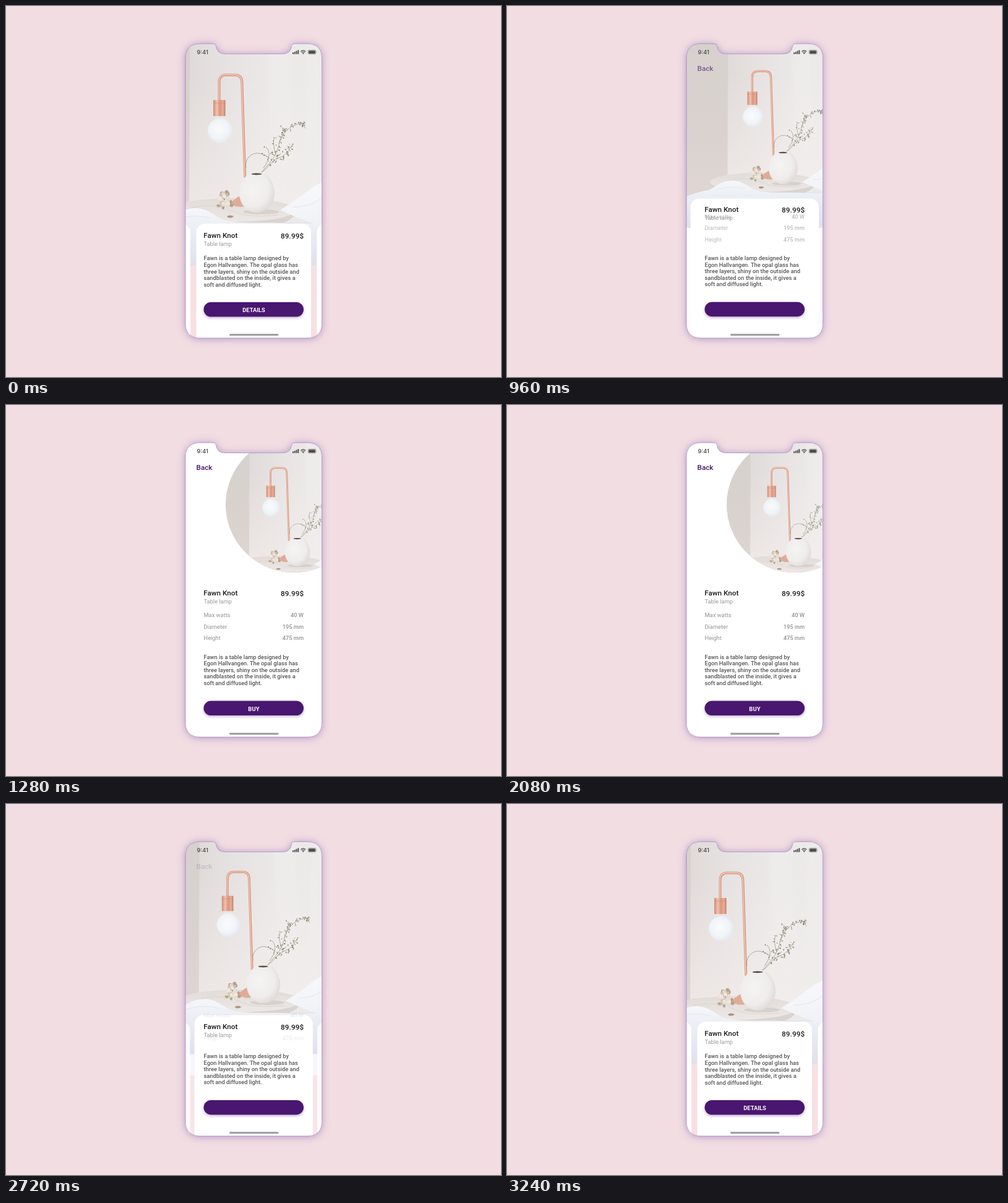
An HTML page for the animation above (3.28 s loop, 800 px wide and 600 px high).

```html
<!DOCTYPE html>
<html lang="en">
<head>
<meta charset="utf-8">
<title>Lamp shop</title>
<style>
  html, body { margin: 0; width: 100%; height: 100%; overflow: hidden; background: #f2dee2; }
  svg { display: block; width: 800px; height: 600px; }
  text { font-family: Roboto, sans-serif; font-size: 9.3px; }
  .title { font-size: 11.7px; font-weight: 500; fill: #1c1c1e; }
  .sub { fill: #999; }
  .copy { font-weight: 500; fill: #565656; }
  .spec { fill: #929292; }
  .num { font-weight: 500; }
  .end { text-anchor: end; }
  .label { font-size: 9.4px; font-weight: 700; fill: #fff; text-anchor: middle; }
  .back { font-size: 11.7px; font-weight: 500; fill: #461568; }
  .clock { font-family: Inter, sans-serif; font-size: 9.1px; font-weight: 600; fill: #555; }
</style>
</head>
<body>
<svg viewBox="0 0 800 600">
  <defs>
    <path id="phone" d="M290 84 C290 69 299 61 314 61 H335 Q339 61 339.500 65 Q341 77.500 354 77.500 H447 Q460 77.500 461.500 65 Q462 61 466 61 H487 C502 61 510.500 69 510.500 84 V514 C510.500 529 502 537 487 537 H314 C299 537 290 529 290 514 Z"/>
    <path id="pole" d="M344.500 153 V123 Q344.500 111.500 356 111.500 H370 Q381 111.500 381.300 123 L386.300 276"/>
    <clipPath id="screen"><use href="#phone"/></clipPath>
    <clipPath id="lens"><circle id="lensShape" cx="465" cy="161" r="640"/></clipPath>
    <filter id="glow" x="-20%" y="-20%" width="140%" height="140%">
      <feDropShadow dx="0" dy="1" stdDeviation="6.500" flood-color="#7040a4" flood-opacity=".5"/>
    </filter>
    <filter id="lift" x="-10%" y="-30%" width="120%" height="200%">
      <feDropShadow dx="0" dy="1.700" stdDeviation="2" flood-color="#4a146f" flood-opacity=".36"/>
    </filter>
    <filter id="soft" x="-20%" y="-20%" width="140%" height="140%"><feGaussianBlur stdDeviation="3"/></filter>
    <linearGradient id="wall">
      <stop offset="0" stop-color="#e0dbd9"/><stop offset=".2" stop-color="#e6e2e1"/>
      <stop offset=".5" stop-color="#ecebea"/><stop offset="1" stop-color="#e9e7e6"/>
    </linearGradient>
    <linearGradient id="side" x2="0" y2="1">
      <stop offset="0" stop-color="#d6d1ce"/><stop offset=".6" stop-color="#d9d2cf"/><stop offset="1" stop-color="#e0d7d4"/>
    </linearGradient>
    <linearGradient id="daylight" x2="0" y2="1">
      <stop offset=".3" stop-color="#f5efed" stop-opacity="0"/><stop offset="1" stop-color="#f5efed" stop-opacity=".65"/>
    </linearGradient>
    <linearGradient id="copper">
      <stop offset="0" stop-color="#cf8b73"/><stop offset=".3" stop-color="#f3c3b0"/>
      <stop offset=".55" stop-color="#d9967c"/><stop offset=".8" stop-color="#e8ae99"/><stop offset="1" stop-color="#bf7b63"/>
    </linearGradient>
    <radialGradient id="bulb" cx=".45" cy=".45" r=".6">
      <stop offset="0" stop-color="#f9fbfc"/><stop offset=".6" stop-color="#f1f4f8"/><stop offset="1" stop-color="#e3e8ee"/>
    </radialGradient>
    <radialGradient id="vase" cx=".38" cy=".4" r=".75">
      <stop offset="0" stop-color="#f5f4f3"/><stop offset=".6" stop-color="#efedec"/><stop offset="1" stop-color="#d5d1cf"/>
    </radialGradient>
    <linearGradient id="marble" x2="0" y2="1">
      <stop offset="0" stop-color="#e2dcd8"/><stop offset="1" stop-color="#ece8e6"/>
    </linearGradient>
    <linearGradient id="sheet" x2="0" y2="1">
      <stop offset="0" stop-color="#f6f7fa"/><stop offset=".3" stop-color="#edeff5"/><stop offset="1" stop-color="#dfe0ec"/>
    </linearGradient>
    <linearGradient id="pillow" x1=".3" y1="0" x2=".6" y2="1">
      <stop offset="0" stop-color="#fafafc"/><stop offset="1" stop-color="#eef0f5"/>
    </linearGradient>
  </defs>

  <rect width="800" height="600" fill="#f2dee2"/>
  <use href="#phone" fill="#fff" filter="url(#glow)"/>

  <g clip-path="url(#screen)">
    <rect x="285" y="55" width="230" height="490" fill="#fff"/>
    <rect id="haze" x="285" y="330" width="230" height="210" fill="#f4f1f9"/>
    <rect id="pink" x="285" y="420" width="230" height="240" fill="#f8e0e2"/>

    <g clip-path="url(#lens)">
      <g id="photo">
        <rect x="150" y="20" width="450" height="400" fill="url(#sheet)"/>
        <rect x="296" y="20" width="304" height="330" fill="url(#wall)"/>
        <rect x="150" y="20" width="147" height="350" fill="url(#side)"/>
        <rect x="296" y="20" width="304" height="320" fill="url(#daylight)"/>
        <g filter="url(#soft)">
          <path d="M422 20 L430 260 L418 320 L470 320 L455 20Z" fill="#f0eeed" opacity=".5"/>
          <path d="M489 20 L480 300 L512 300 L508 20Z" fill="#efeeed" opacity=".6"/>
        </g>
        <path d="M262 332 Q264 345 310 355 H430 Q462 350 468 335Z" fill="#dad4d1"/>
        <ellipse cx="366" cy="330" rx="104" ry="19" fill="url(#marble)"/>
        <path d="M300 326 Q340 318 365 331 T440 338" fill="none" stroke="#d9d2ce" stroke-width=".8"/>
        <ellipse cx="412" cy="333" rx="29" ry="4" fill="#c8c0bb" opacity=".5"/>

        <path d="M361 319 L376 308 L388 309 L386 324 Q372 327 361 319Z" fill="#dfac98"/>
        <g fill="none" stroke-linecap="round">
          <use href="#pole" stroke="#d8977f" stroke-width="4"/>
          <use href="#pole" stroke="#f3cbbb" stroke-width="1.500" transform="translate(-.3 -.3)"/>
        </g>
        <path d="M338 176 H352 Q352 183 358 186 H334 Q339 183 338 176Z" fill="#e7e6e8"/>
        <circle cx="346" cy="201.500" r="20" fill="url(#bulb)"/>
        <rect x="335" y="152" width="19.500" height="26" rx="1" fill="url(#copper)"/>
        <path d="M335 157 H354.500" stroke="#c58770" stroke-width=".6"/>

        <g id="branch" fill="none" stroke="#99917f" stroke-width=".75">
          <path d="M410 272 C422 258 436 246 440 228 C445 206 458 190 485 189"/>
          <path d="M411 270 C424 264 426 250 447 243 Q456 237 463 224"/>
          <path d="M416 262 Q432 240 420 228 M436 240 Q430 222 434 212 M444 214 Q450 205 447 196 M478 189 L484 198"/>
          <path d="M388 262 C385 248 396 237 408 238 Q418 239 426 246"/>
        </g>
        <g id="leaves"></g>
        <path d="M392 271 C383 279 377 290 377 302 C377 320 389 334 405 334 C422 334 434 319 434 302 C434 289 427 277 419 271Z" fill="url(#vase)"/>
        <ellipse cx="405.500" cy="271.500" rx="13.500" ry="2.800" fill="#efedeb"/>
        <ellipse cx="405" cy="271.800" rx="8.500" ry="1.500" fill="#57514d"/>
        <g id="shell"></g>
        <path d="M357 340 Q362 337 368 340 Q366 343 359 342.500Z" fill="#ad9480"/>

        <path d="M150 372 C210 366 225 350 258 346 C273 340 278 328 306 327 C329 328 336 340 352 346 C380 354 425 348 456 352 L600 350 V420 H150Z" fill="url(#sheet)"/>
        <path d="M270 346 Q302 335 331 343" fill="none" stroke="#e2e6ee" stroke-width="1.500" opacity=".7"/>
        <path d="M443 330 Q462 319 480 305 Q496 291 510 286 L600 270 V365 L510 356 Q478 346 443 330Z" fill="url(#pillow)"/>
        <path d="M464 325 Q490 326 512 309" fill="none" stroke="#e6e9f0" stroke-width="1.200"/>
      </g>
    </g>

    <g id="leftCard"><rect x="113" y="352" width="185" height="220" rx="14" fill="#fff"/></g>
    <g id="rightCard"><rect x="502.500" y="352" width="185" height="220" rx="14" fill="#fff"/></g>
    <rect id="card" rx="14" fill="#fff"/>

    <g id="specs"></g>
    <g id="head">
      <text class="title" x="319.300" y="374.700">Fawn Knot</text>
      <text class="title end" x="481.300" y="375.800" letter-spacing=".15">89.99$</text>
      <text class="sub" x="319.500" y="387.700">Table lamp</text>
    </g>
    <g id="copy"></g>
    <g id="button">
      <rect x="319.500" y="479" width="161.500" height="23.600" rx="11.800" fill="#4a146f" filter="url(#lift)"/>
      <text id="details" class="label" x="400.500" y="495">DETAILS</text>
      <text id="buy" class="label" x="400.500" y="495" letter-spacing=".2">BUY</text>
    </g>
    <text id="back" class="back" x="307.500" y="105">Back</text>

    <text class="clock" x="308.500" y="78.200">9:41</text>
    <g fill="#4b4b4b">
      <rect x="463" y="75" width="1.900" height="2.800" rx=".5"/>
      <rect x="465.800" y="73.900" width="1.900" height="3.900" rx=".5"/>
      <rect x="468.600" y="72.600" width="1.900" height="5.200" rx=".5"/>
      <rect x="471.400" y="71.200" width="1.900" height="6.600" rx=".5"/>
      <path d="M480.300 78 L478.700 76.400 Q480.300 75.200 481.900 76.400Z"/>
      <path d="M477.700 75.300 Q480.300 73.200 482.900 75.300 M476.200 73.600 Q480.300 70.300 484.400 73.600" fill="none" stroke="#4b4b4b" stroke-width="1.200"/>
      <rect x="488.200" y="71.300" width="12.600" height="6.600" rx="1.800" fill="none" stroke="#777" stroke-width=".7"/>
      <rect x="489.200" y="72.300" width="10.600" height="4.600" rx="1"/>
      <path d="M501.500 73.500 Q502.600 74.600 501.500 75.700Z"/>
    </g>
    <rect x="361" y="530.300" width="79.500" height="2.900" rx="1.450" fill="#9d9b9d"/>
  </g>
  <use href="#phone" fill="none" stroke="#9677bd" stroke-width=".8" opacity=".8"/>
</svg>

<script>
const LOOP = 3280, STEP = 40, MOVE = 480, OPEN = 680, CLOSE = 2362;
const $ = id => document.getElementById(id);
const lerp = (a, b, p) => a + (b - a) * p;

function add(parent, tag, attrs, text) {
  const el = document.createElementNS("http://www.w3.org/2000/svg", tag);
  set(el, attrs);
  if (text) el.textContent = text;
  parent.appendChild(el);
}
function set(el, attrs) {
  for (const k in attrs) el.setAttribute(k, attrs[k]);
}

let seed = 7;
function rand() {
  seed = (seed * 16807) % 2147483647;
  return seed / 2147483647;
}

[
  "Fawn is a table lamp designed by",
  "Egon Hallvangen. The opal glass has",
  "three layers, shiny on the outside and",
  "sandblasted on the inside, it gives a",
  "soft and diffused light."
].forEach((line, i) => add($("copy"), "text", { class: "copy", x: 319.5, y: 411.4 + i * 10.55 }, line));

[["Max watts", "40 W"], ["Diameter", "195 mm"], ["Height", "475 mm"]].forEach(([name, value], i) => {
  const y = 342.6 + i * 18.9;
  add($("specs"), "text", { class: "spec", x: 319.5, y }, name);
  add($("specs"), "text", { class: "spec num end", x: 481, y }, value);
});

// Leaves cluster along each twig
document.querySelectorAll("#branch path").forEach((twig, n) => {
  const len = twig.getTotalLength();
  const count = [34, 34, 26, 4][n];
  for (let i = 0; i < count; i++) {
    const pt = twig.getPointAtLength(len * (0.3 + 0.7 * rand()));
    const x = pt.x + (rand() - 0.5) * 10, y = pt.y + (rand() - 0.5) * 9;
    add($("leaves"), "ellipse", {
      cx: x, cy: y, rx: 0.9 + rand() * 0.9, ry: 0.6 + rand() * 0.5,
      fill: ["#9a9785", "#b0ac9d", "#858270"][i % 3],
      transform: `rotate(${rand() * 180} ${x} ${y})`
    });
  }
});

// Ornament on the table
for (let i = 0; i < 44; i++) {
  const v = rand();
  add($("shell"), "circle", {
    cx: 353 + (rand() - 0.5) * (8 + v * 24), cy: 300 + v * 27, r: 1.4 + rand() * 2,
    fill: ["#e6dccf", "#d3c4b2", "#f0e8de", "#b5a190"][i % 4]
  });
}

function ease(u) {
  u = Math.min(1, Math.max(0, u));
  return u * u * (3 - 2 * u);
}

function draw(t) {
  const p = ease((t - OPEN) / MOVE) - ease((t - CLOSE) / MOVE);
  const scale = lerp(1, 0.714, p);
  set($("photo"), { transform: `translate(${181.5 * p} ${22 * p}) scale(${scale})` });
  set($("lensShape"), { r: lerp(640, 110, p) });
  set($("haze"), { opacity: (1 - p) ** 2 });
  set($("pink"), { y: 420 + 118 * p, opacity: (1 - p) ** 2 });

  const x = lerp(307.5, 290, p), top = lerp(352, 287, p);
  set($("card"), { x, y: top, width: 2 * (400.25 - x), height: 560 - top });
  set($("leftCard"), { transform: `translate(${-4 * p} 0)`, opacity: 1 - p });
  set($("rightCard"), { transform: `translate(${4 * p} 0)`, opacity: 1 - p });

  set($("head"), { transform: `translate(0 ${-67 * p})` });
  set($("specs"), { transform: `translate(0 ${2.5 * (1 - p)})`, opacity: p });
  set($("copy"), { transform: `translate(0 ${-0.7 * p})` });
  set($("button"), { transform: `translate(0 ${-0.5 * p})` });
  set($("back"), { opacity: p });
  set($("details"), { opacity: p < 0.01 ? 1 : 0 });
  set($("buy"), { opacity: p > 0.99 ? 1 : 0 });
}

const start = performance.now();
function tick() {
  const t = (performance.now() - start) % LOOP;
  draw(Math.floor(t / STEP) * STEP);
  requestAnimationFrame(tick);
}
tick();
</script>
</body>
</html>
```
